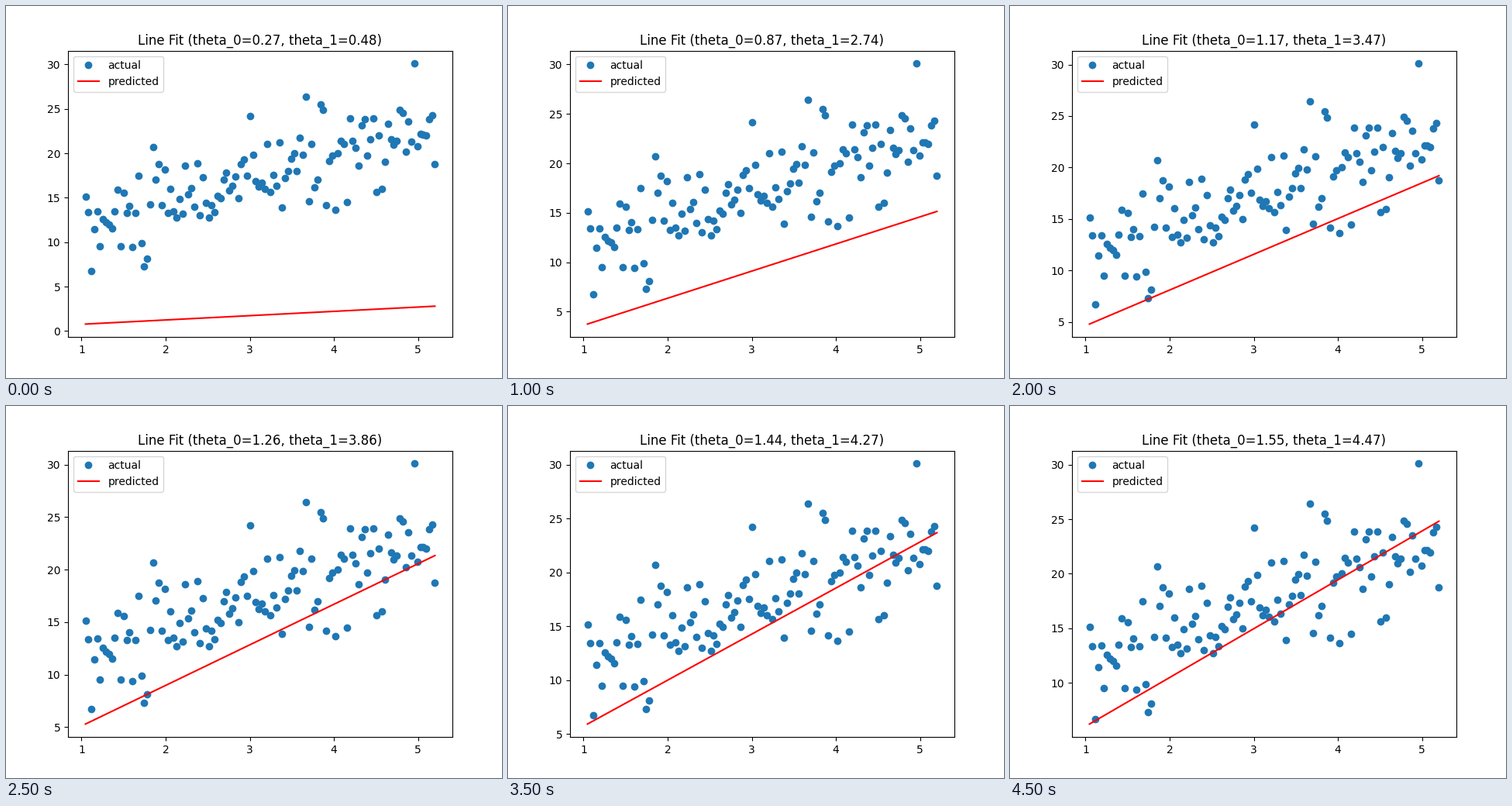
A matplotlib script for the animation above (5 s loop, 640 px wide and 480 px high).

```python
import numpy as np
import matplotlib.pyplot as plt
from matplotlib.animation import FuncAnimation

FRAMES = 10
INTERVAL = 500
BATCHES = 3
RATE = 0.02

# Noisy straight line, sampled every two degrees
rng = np.random.RandomState(10)
x = np.radians(np.arange(60, 300, 2))
y = 3 * x + 8 + rng.normal(0, 3, len(x))


def descend(steps):
    """Mini-batch gradient descent, returning theta after every step."""
    batches = list(zip(np.split(x, BATCHES), np.split(y, BATCHES)))
    theta = np.zeros(2)
    history = []
    for k in range(steps):
        bx, by = batches[k % BATCHES]
        error = by - (theta[0] + theta[1] * bx)
        theta = theta + RATE * np.array([error.mean(), (error * bx).mean()])
        history.append(theta)
    return history


thetas = descend(FRAMES)

fig, ax = plt.subplots(figsize=(6.4, 4.8), dpi=100)
ax.plot(x, y, "o", label="actual")
line, = ax.plot(x, x, "r-", label="predicted")
ax.legend(loc="upper left")
title = ax.set_title("")


def draw(i):
    t0, t1 = thetas[i]
    line.set_ydata(t0 + t1 * x)
    title.set_text(f"Line Fit (theta_0={t0:.2f}, theta_1={t1:.2f})")
    ax.relim()
    ax.autoscale_view()
    return line, title


anim = FuncAnimation(fig, draw, frames=FRAMES, init_func=lambda: draw(0),
                     interval=INTERVAL, repeat=True, repeat_delay=0)
plt.show()
```
